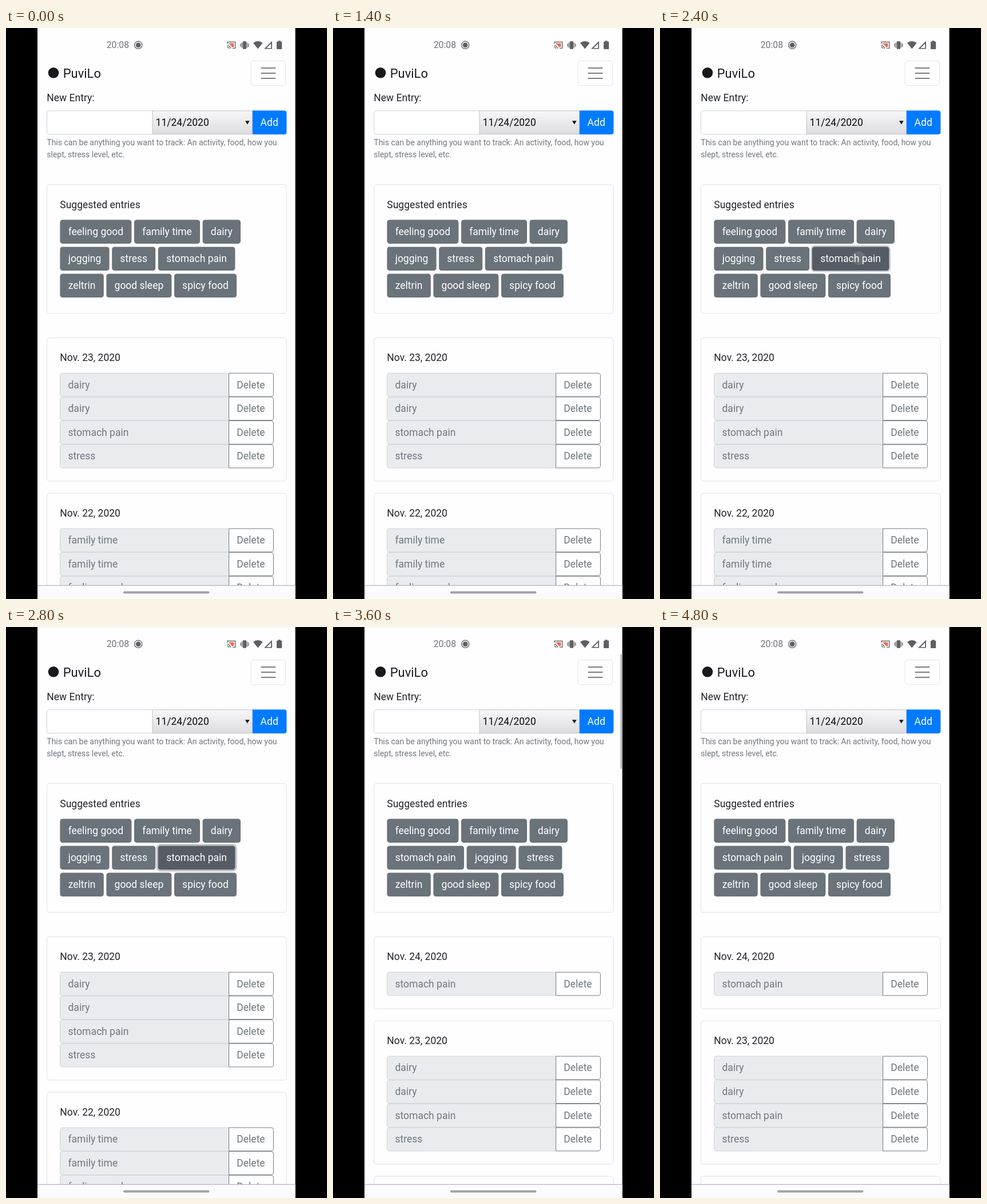
These frames come from a looping animation (561x998 px, 5 s). An HTML page:

```html
<!DOCTYPE html>
<html lang="en">
<head>
<meta charset="utf-8">
<title>Mood diary</title>
<style>
  html, body { margin: 0; width: 100%; height: 100%; overflow: hidden; background: #000; }
  svg { display: block; width: 100%; height: 100%; }
  text { font-family: Roboto, Arial, sans-serif; font-size: 17.5px; fill: #212529; white-space: pre; }
  .mid { text-anchor: middle; }
  .light { fill: #fff; }
  .muted { fill: #70777f; }
</style>
</head>
<body>
<svg id="stage" viewBox="0 0 561 998">
  <defs>
    <linearGradient id="shade" x1="0" y1="0" x2="0" y2="1">
      <stop offset="0" stop-color="#f7f6f8"/>
      <stop offset="1" stop-color="#dddcde"/>
    </linearGradient>
    <clipPath id="view"><rect x="55" y="48" width="451" height="926"/></clipPath>
  </defs>
  <rect width="561" height="998" fill="#000"/>
  <rect x="55" width="450.6" height="998" fill="#fefdff"/>

  <!-- status bar -->
  <text x="175.7" y="35.2" style="font-size:15.8px;fill:#737376">20:08</text>
  <circle cx="231.2" cy="29.8" r="6.6" fill="none" stroke="#5f5f62" stroke-width="1.3"/>
  <circle cx="231.2" cy="29.8" r="4.4" fill="#5f5f62"/>
  <g fill="none" stroke="#68686b" stroke-width="1.4">
    <path d="M387 27.5V24.5H400.7V35.4H396"/>
    <path d="M386.5 30.3A5.7 5.7 0 0 1 392.2 36M386.5 33A3 3 0 0 1 389.5 36"/>
    <path d="M389.3 26.8H398.4V33.2H394.6A8 8 0 0 0 389.3 28Z" fill="#ee6a45" stroke="none"/>
    <path d="M410 27.2V32.8M412.4 25.4V34.6M421.4 25.4V34.6M423.8 27.2V32.8"/>
  </g>
  <g fill="#5f5f62">
    <rect x="413.8" y="23.3" width="6.2" height="13.4" rx="1"/>
    <path d="M440.3 36.4L432 26.2Q440.3 19.6 448.6 26.2Z"/>
    <path d="M465 22.8V36.6H451ZM463.2 27.2L455.3 35H463.2Z" fill-rule="evenodd"/>
    <path d="M475.6 23.8V22.3H479.6V23.8H481.2Q482.2 23.8 482.2 24.8V36Q482.2 37 481.2 37H474Q473 37 473 36V24.8Q473 23.8 474 23.8Z"/>
  </g>

  <!-- header and form -->
  <circle cx="83" cy="78.3" r="9.3" fill="#18181a"/>
  <text x="99.8" y="86.8" style="font-size:21.9px;fill:#18181a">PuviLo</text>
  <rect x="428.2" y="57.5" width="60.4" height="43" rx="4.4" fill="none" stroke="#e4e3e6"/>
  <path d="M446.5 70H470.5M446.5 79H470.5M446.5 88H470.5" stroke="#7d7d80" stroke-width="2.1" stroke-linecap="round"/>
  <text x="71.3" y="128.3">New Entry:</text>
  <path d="M256 144.8H75.9Q71.5 144.8 71.5 149.2V181.2Q71.5 185.6 75.9 185.6H256" fill="#fff" stroke="#ced4da"/>
  <rect x="256" y="144.8" width="175" height="40.8" fill="url(#shade)" stroke="#c3c3c6"/>
  <text x="261.6" y="170.8" style="fill:#0c0c0c">11/24/2020</text>
  <path d="M417.9 162.2H425.7L421.8 168.6Z" fill="#111"/>
  <path d="M430.8 144.3H486Q490.4 144.3 490.4 148.7V181.7Q490.4 186.1 486 186.1H430.8Z" fill="#007bff"/>
  <text class="mid light" x="460.2" y="170.8">Add</text>
  <text class="muted" x="71.3" y="204.9" style="font-size:14px">This can be anything you want to track: An activity, food, how you</text>
  <text class="muted" x="71.3" y="225.8" style="font-size:14px">slept, stress level, etc.</text>

  <g clip-path="url(#view)">
    <g id="before"></g>
    <g id="after"></g>
  </g>
  <rect id="bar" x="502.3" y="48" width="3.3" height="200" fill="#b5b4b8"/>

  <!-- system navigation -->
  <rect x="55" y="974" width="450.6" height="24" fill="#fbfafc"/>
  <path d="M55 974.3H505.6" stroke="#b7b6b9" stroke-width="1.2"/>
  <rect x="205" y="984.6" width="150.4" height="4" rx="2" fill="#a2a1a4"/>
</svg>
<script>
const LOOP = 5000, STEP = 200;
const PRESS = 2400, SETTLE = 2600, ADDED = 3600;
const ROW = 41.6, TAG_H = 41.6, GAP = 4.6;
const $ = id => document.getElementById(id);

const TAG_WIDTH = {
  'feeling good': 125, 'family time': 115, 'dairy': 66.4,
  'jogging': 86.2, 'stress': 76, 'stomach pain': 134.6,
  'zeltrin': 76.4, 'good sleep': 114, 'spicy food': 109
};
const TOP_TAGS = ['feeling good', 'family time', 'dairy'];
const LAST_TAGS = ['zeltrin', 'good sleep', 'spicy food'];

const DAYS = [
  ['Nov. 23, 2020', ['dairy', 'dairy', 'stomach pain', 'stress']],
  ['Nov. 22, 2020', ['family time', 'family time', 'feeling good']]
];

const label = (x, y, str, cls = '') => `<text class="${cls}" x="${x}" y="${y}">${str}</text>`;

const box = (y, h) =>
  `<rect x="71.5" y="${y}" width="418.5" height="${h}" rx="4.4" fill="none" stroke="#e0dfe2"/>`;

function tag(name, x, y, live) {
  const w = TAG_WIDTH[name];
  const shape = `x="${x}" y="${y}" width="${w}" height="${TAG_H}" rx="4.4"`;
  const glow = live ? `<rect id="ring" ${shape} fill="none" stroke="#828a91"/>` : '';
  const touch = live ? `<circle id="touch" cx="347" cy="402" r="12" fill="#fff" opacity=".13"/>` : '';
  return glow + `<rect ${live ? 'id="live"' : ''} ${shape} fill="#6a727a"/>` + touch +
    label(x + w / 2, y + 26.6, name, 'mid light');
}

function suggestions(middle, liveName) {
  let out = box(273.5, 225.3) + label(94.3, 315, 'Suggested entries');
  [TOP_TAGS, middle, LAST_TAGS].forEach((names, i) => {
    let x = 94.4;
    for (const name of names) {
      out += tag(name, x, 335.3 + i * 47.1, name === liveName);
      x += TAG_WIDTH[name] + GAP;
    }
  });
  return out;
}

function entry(name, y) {
  const h = ROW - 0.8, b = y + h;
  return `<path d="M389.5 ${y}H98.9Q94.5 ${y} 94.5 ${y + 4.4}V${b - 4.4}Q94.5 ${b} 98.9 ${b}H389.5" fill="#e9ebef" stroke="#ced4da"/>
    <path d="M389.5 ${y}H463Q467.4 ${y} 467.4 ${y + 4.4}V${b - 4.4}Q467.4 ${b} 463 ${b}H389.5Z" fill="#fefdff" stroke="#737b83"/>` +
    label(108.5, y + 26.2, name, 'muted') + label(428, y + 26.2, 'Delete', 'mid muted');
}

function diary(days) {
  let y = 541.5, out = '';
  for (const [date, names] of days) {
    const h = 84 + names.length * ROW;
    out += box(y, h) + label(94.3, y + 40.8, date);
    names.forEach((name, i) => { out += entry(name, y + 61.8 + i * ROW); });
    y += h + 21.3;
  }
  return out;
}

$('before').innerHTML = suggestions(['jogging', 'stress', 'stomach pain'], 'stomach pain') + diary(DAYS);
$('after').innerHTML = suggestions(['stomach pain', 'jogging', 'stress']) +
  diary([['Nov. 24, 2020', ['stomach pain']], ...DAYS]);

const show = (id, on) => $(id).setAttribute('display', on ? 'inline' : 'none');

function draw(now) {
  const t = Math.floor(now % LOOP / STEP) * STEP;
  const pressed = t >= PRESS, settled = t >= SETTLE, added = t >= ADDED;
  show('before', !added);
  show('after', added);
  show('ring', pressed);
  show('touch', pressed && !settled);
  $('live').setAttribute('fill', pressed ? '#555c63' : '#6a727a');
  $('ring').setAttribute('stroke-width', settled ? 6.4 : 5);
  $('ring').setAttribute('stroke-opacity', settled ? 0.5 : 0.42);
  $('bar').setAttribute('opacity', t === ADDED ? 1 : t === ADDED + STEP ? 0.5 : 0);
}

function tick() {
  draw(performance.now());
  requestAnimationFrame(tick);
}
tick();
</script>
</body>
</html>
```
